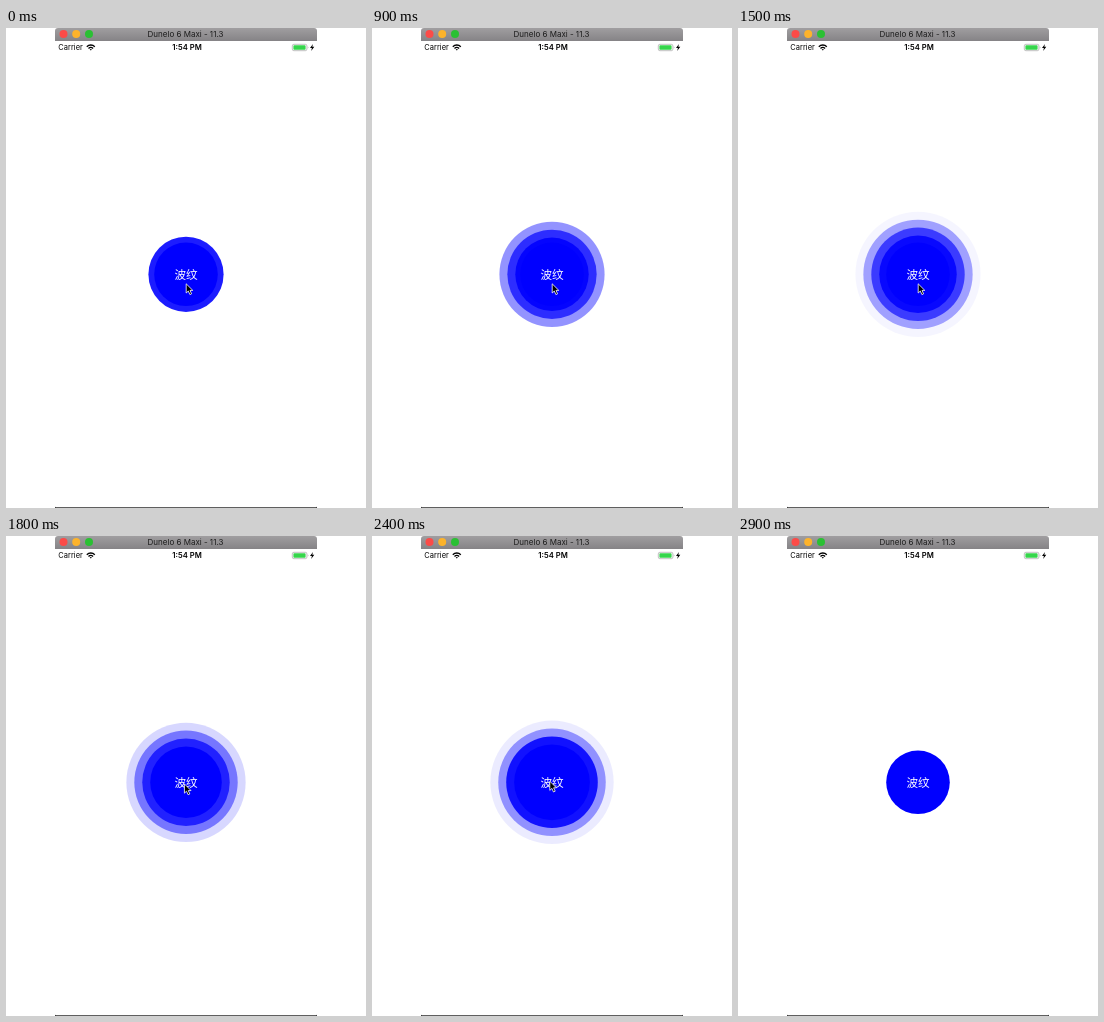
Recreate the animation shown at these times as an HTML page. Size 360 px wide and 480 px high, loop 3000 ms.

```html
<!DOCTYPE html>
<html lang="zh">
<head>
<meta charset="utf-8">
<title>Ripple button</title>
<style>
  html, body { margin: 0; width: 100%; height: 100%; overflow: hidden; background: #fff; }
  svg { display: block; width: 360px; height: 480px; }
  text { font-family: Inter, "Liberation Sans", sans-serif; }
  .mid { text-anchor: middle; }
</style>
</head>
<body>
<svg viewBox="0 0 360 480">
  <defs>
    <linearGradient id="bar" x2="0" y2="1">
      <stop stop-color="#a09ea0"/>
      <stop offset="1" stop-color="#858386"/>
    </linearGradient>
  </defs>

  <!-- Window frame -->
  <path d="M49 13V3q0-3 3-3H308q3 0 3 3V13Z" fill="url(#bar)"/>
  <circle cx="57.5" cy="6" r="4" fill="#fc4b48"/>
  <circle cx="70.2" cy="6" r="4" fill="#fdb32b"/>
  <circle cx="83" cy="6" r="4" fill="#2ac033"/>
  <text class="mid" x="179.5" y="9" font-size="8" fill="#1c1c1c">Dunelo 6 Maxi - 11.3</text>
  <path d="M49 478.5q0 .8 1 .8H310q1 0 1-.8V480H49Z" fill="#2b2b2b"/>

  <!-- Status bar -->
  <text x="52.3" y="22.4" font-size="7.5">Carrier</text>
  <g fill="none" stroke="#000" stroke-width="1.4">
    <path d="M80.8 18.7a5.7 5.7 0 0 1 8 0M82.5 20.5a3.3 3.3 0 0 1 4.6 0"/>
    <path d="M84.8 22.6l-1.1-1.2a1.6 1.6 0 0 1 2.2 0Z" fill="#000" stroke="none"/>
  </g>
  <text class="mid" x="181" y="22.4" font-size="7.7" font-weight="600">1:54 PM</text>
  <rect x="286.3" y="16.3" width="14.6" height="6.4" rx="1.6" fill="#fff" stroke="#a5a5a5" stroke-width=".7"/>
  <rect x="287.4" y="17.3" width="12.2" height="4.4" rx=".8" fill="#35d64b"/>
  <path d="M301.8 18.3q1.4 1.2 0 2.4Z" fill="#a5a5a5"/>
  <path d="M307 16l-3 4h1.9l-.7 3 3.1-4.2h-2Z"/>

  <!-- Button -->
  <g id="ripples" fill="#00f"></g>
  <circle cx="180" cy="246.3" r="31.8" fill="#00f"/>
  <text class="mid" x="180" y="250.8" font-size="11.6" fill="#fff" style="font-family:'Noto Sans CJK SC','Noto Sans CJK',sans-serif">波纹</text>
  <path id="cursor" d="M0 0V9.2L2.1 7.2 3.7 10.8 5.4 10 3.8 6.6H6.6Z" stroke="#fff" stroke-width=".8"/>
</svg>
<script>
  const LOOP = 3000, STEP = 100, RADIUS = 31.8, LIFE = 2, GAP = 0.5;
  const group = document.getElementById("ripples");
  const cursor = document.getElementById("cursor");

  const ripples = Array.from({ length: 7 }, () => {
    const circle = document.createElementNS("http://www.w3.org/2000/svg", "circle");
    circle.setAttribute("cx", 180);
    circle.setAttribute("cy", 246.3);
    return group.appendChild(circle);
  });

  function draw(now) {
    const time = Math.floor((now % LOOP) / STEP) * STEP;
    const idle = time >= 2900;
    const clock = 0.365 + 1.048 * time / 1000;

    ripples.forEach((circle, i) => {
      const u = (clock - i * GAP) / LIFE;
      const alive = !idle && u >= 0 && u < 1;
      const fade = alive ? u ** 1.3 : 1;
      circle.setAttribute("r", alive ? RADIUS * (1 + u) : 0);
      // A second tap doubles every ripple from the fifth on.
      circle.setAttribute("fill-opacity", 1 - (i < 4 ? fade : fade * fade));
    });

    const p = Math.min(1, Math.max(0, (time - 1600) / 300));
    const move = p * p * (3 - 2 * p);
    cursor.setAttribute("transform", `translate(${180.2 - 2.4 * move} ${255.8 - 10.6 * move})`);
    cursor.setAttribute("visibility", idle ? "hidden" : "visible");
  }

  const start = performance.now();
  function tick() {
    draw(performance.now() - start);
    requestAnimationFrame(tick);
  }
  tick();
</script>
</body>
</html>
```
